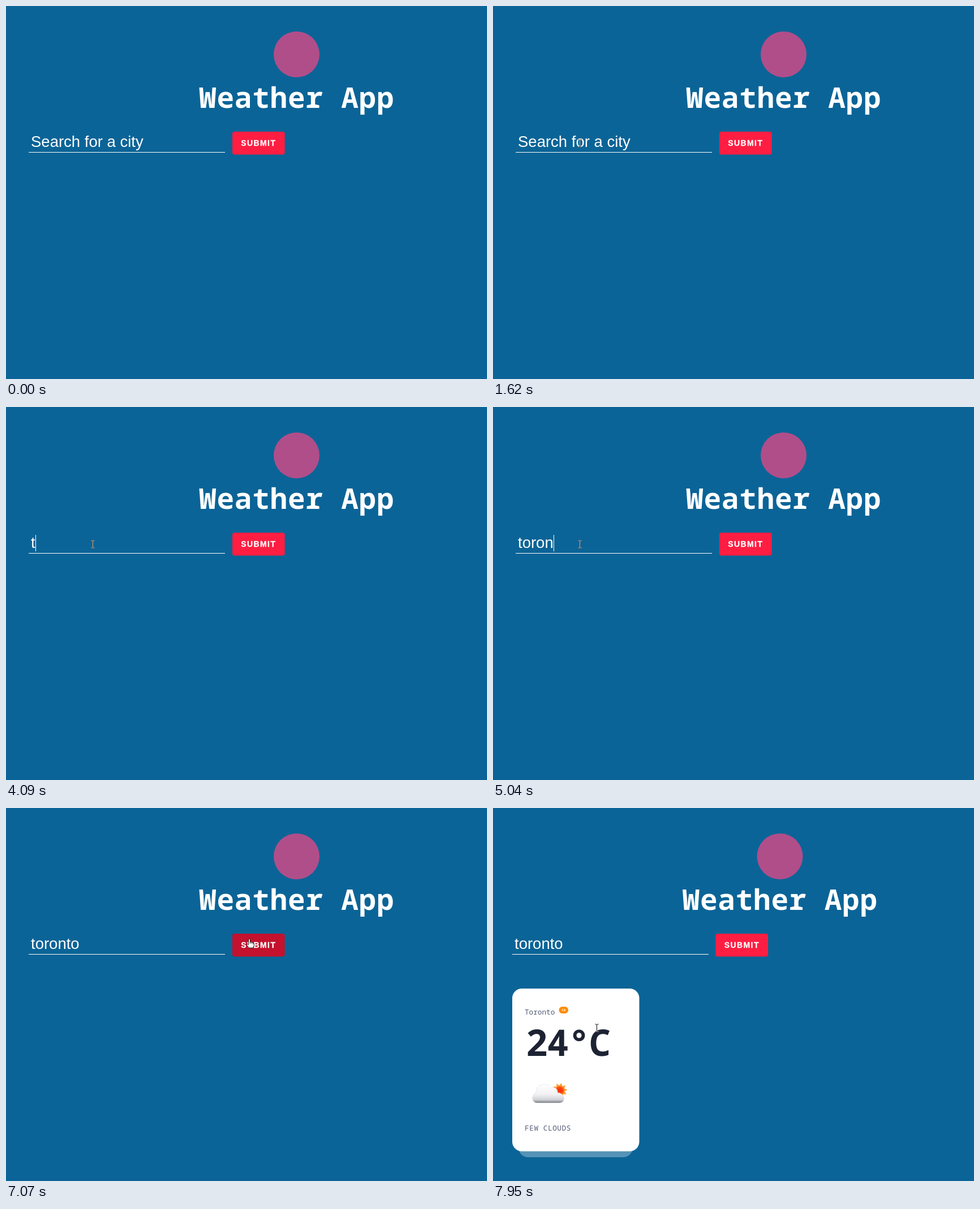
Animation, 850 px wide and 659 px high, one loop 8000 ms. Source, as an HTML page:

```html
<!DOCTYPE html>
<html lang="en">
<head>
<meta charset="utf-8">
<title>Weather App</title>
<style>
  html, body { margin: 0; width: 100%; height: 100%; overflow: hidden; background: #0b6497; }
  svg { display: block; width: 850px; height: 659px; }
  .mono { font-family: "Noto Sans Mono", "DejaVu Sans Mono", monospace; }
  .sans { font-family: "Liberation Sans", Arial, sans-serif; }
  #title { font-size: 51px; font-weight: 700; letter-spacing: .8px; fill: #fff; }
  #field { font-size: 27.5px; fill: #fff; }
  #label { font-size: 14px; font-weight: 700; letter-spacing: 1.4px; fill: #fff; stroke: #fff; stroke-width: .3px; }
  #temp { font-size: 65px; font-weight: 700; letter-spacing: -1.8px; fill: #1d2333; }
  .small { font-size: 12.7px; fill: #565c74; }
  #sky { letter-spacing: .58px; }
  #badge { font-size: 6px; font-weight: 700; fill: #fff; }
  #ibeam { mix-blend-mode: difference; }
</style>
</head>
<body>
<svg viewBox="0 0 850 659" xmlns="http://www.w3.org/2000/svg">
  <defs>
    <linearGradient id="cloudFill" x1="0" y1="0" x2="0" y2="1">
      <stop offset="0" stop-color="#fff"/>
      <stop offset=".55" stop-color="#f1f1f3"/>
      <stop offset=".84" stop-color="#cfd0d5"/>
      <stop offset="1" stop-color="#74767e"/>
    </linearGradient>
    <radialGradient id="sunFill">
      <stop offset="0" stop-color="#ff2a0a"/>
      <stop offset=".7" stop-color="#fb4712"/>
      <stop offset="1" stop-color="#ff8a1e"/>
    </radialGradient>
  </defs>
  <rect width="850" height="659" fill="#0b6497"/>

  <g id="head">
    <circle cx="513.5" cy="85.5" r="40.5" fill="#b04e8a"/>
    <text id="title" class="mono" x="341" y="180">Weather App</text>
    <rect id="button" x="400" y="222" width="92.6" height="40.5" rx="4"/>
    <text id="label" class="sans" x="415.3" y="247">SUBMIT</text>
  </g>
  <g id="search">
    <text id="field" class="sans" x="44" y="249"></text>
    <rect x="40" y="258" width="347" height="1" fill="#fff"/>
    <rect id="caret" y="226" width="1" height="29" fill="#fff"/>
  </g>

  <g id="card">
    <rect x="45" y="560" width="202" height="57" rx="17" fill="#fff" fill-opacity=".3"/>
    <rect x="34" y="319" width="224.5" height="287.5" rx="17" fill="#fff"/>
    <text class="mono small" x="56" y="365">Toronto</text>
    <rect x="116.5" y="351" width="16.5" height="12" rx="6" fill="#ff8c00"/>
    <text id="badge" class="mono" x="124.8" y="359.4" text-anchor="middle">CA</text>
    <text id="temp" class="mono" x="58" y="438">24°C</text>
    <g id="rays" fill="#ff9a2e"></g>
    <circle cx="118" cy="499" r="8" fill="url(#sunFill)"/>
    <path fill="url(#cloudFill)" stroke="#d5d6da" stroke-width=".5"
      d="M78 521C68 521 67 507 76 503C76 486 98 484 102 495C109 491 115 497 114 503C127 503 130 521 117 521Z"/>
    <text id="sky" class="mono small" x="56" y="570">FEW CLOUDS</text>
  </g>

  <path id="arrow" fill="#fff" stroke="#000" stroke-width="1" d="M0 0V16.5L3.8 12.9L6.2 18.6L8.8 17.5L6.4 11.9H11.8Z"/>
  <path id="ibeam" fill="none" stroke="#fff" stroke-width="1" d="M-3 -6.5H-1L0 -5.5L1 -6.5H3M0 -5.5V5.5M-3 6.5H-1L0 5.5L1 6.5H3"/>
  <g id="hand">
    <path fill="#fff" stroke="#000" stroke-width=".9" stroke-linejoin="round"
      d="M-1.4 1Q0 -1 1.4 1V6Q3 5 4 6.6Q5.6 5.8 6.5 7.4Q8.2 7 8.2 9.2V12.5L6.6 16.2H-.6L-4.4 11.2Q-4.6 8.9 -2.6 9.4L-1.4 10.6Z"/>
    <path fill="none" stroke="#000" stroke-width=".7" d="M1.4 6V9M4 6.8V9.2M6.4 7.6V9.6"/>
  </g>
</svg>
<script>
const LOOP = 8000;
const HINT = "Search for a city";
const RESULT_AT = 7140;
const $ = id => document.getElementById(id);

// time, text, caret shown
const typing = [
  [0, "", 0], [1090, "", 1], [1620, "", 0],
  [2090, "c", 1], [2220, "ca", 1], [2350, "can", 1], [2480, "cana", 1],
  [3010, "cana", 0], [3080, "can", 1], [3300, "ca", 0], [3430, "c", 1], [3560, "", 1],
  [4090, "t", 1], [4220, "to", 1], [4490, "tor", 1], [4620, "toro", 1],
  [5040, "toron", 1], [5310, "toront", 1], [5440, "toronto", 1],
  [5970, "toronto", 0], [6500, "toronto", 1], [7000, "toronto", 0]
];

// start, end, steps, easing, Bézier points
const easeOut = u => 1 - (1 - u) ** 2;
const easeBoth = u => u * u * (3 - 2 * u);
const linear = u => u;
const moves = [
  [320, 1090, 11, easeOut, [[529, 523], [330, 300], [147, 242]]],
  [1220, 1221, 1, linear, [[153, 242], [153, 242]]],
  [5970, 6730, 11, easeBoth, [[153, 242], [225, 330], [370, 325], [430, 231]]],
  [7140, 7740, 8, easeBoth, [[412, 231], [403, 236]]],
  [7740, 7950, 3, linear, [[403, 236], [252, 254], [183, 388]]]
];

const latest = (rows, t) => rows.filter(r => r[0] <= t).pop();
const ramp = (t, a, b) => Math.min(1, Math.max(0, (t - a) / (b - a)));
const mix = (a, b, u) => a + (b - a) * u;
const show = (el, on) => el.setAttribute("visibility", on ? "visible" : "hidden");
const shift = (el, x, y) => el.setAttribute("transform", `translate(${x} ${y})`);

function bezier(pts, u) {
  while (pts.length > 1)
    pts = pts.slice(1).map((p, i) => [mix(pts[i][0], p[0], u), mix(pts[i][1], p[1], u)]);
  return pts[0];
}

function pointer(t) {
  const move = latest(moves, t);
  if (!move) return null;
  const [from, to, steps, ease, pts] = move;
  const u = Math.floor(ramp(t, from, to) * steps + 1e-6) / steps;
  return bezier(pts, ease(u));
}

function pointerKind(x, y, t) {
  const within = (l, top, r, b) => x >= l && x <= r && y >= top && y <= b;
  if (within(36, 222, 387, 259)) return "ibeam";
  if (within(393, 222, 493, 262)) return "hand";
  if (t >= RESULT_AT && within(56, 380, 210, 450)) return "ibeam";
  return "arrow";
}

function draw(t) {
  const [, text, caret] = latest(typing, t);
  const done = t >= RESULT_AT;
  const field = $("field");
  const shown = text || HINT;
  if (field.textContent !== shown) field.textContent = shown;
  const end = text ? field.getComputedTextLength() : 0;
  $("caret").setAttribute("x", Math.round(44 + end));
  show($("caret"), caret);

  show($("card"), done);
  shift($("head"), done ? -6.5 : 0, 0);
  shift($("search"), done ? -6 : 0, 0);

  const hover = ramp(t, 6690, 6800) - ramp(t, 7770, 7940);
  const rgb = [[255, 196], [30, 17], [66, 45]].map(([a, b]) => Math.round(mix(a, b, hover)));
  $("button").setAttribute("fill", `rgb(${rgb})`);

  const pos = pointer(t);
  const kind = pos && pointerKind(...pos, t);
  for (const id of ["arrow", "ibeam", "hand"]) {
    show($(id), id === kind);
    if (id === kind) {
      const snap = id === "ibeam" ? 0.5 : 0;
      shift($(id), Math.round(pos[0]) + snap, Math.round(pos[1]) + snap);
    }
  }
}

for (let a = 0; a < 360; a += 36)
  $("rays").insertAdjacentHTML("beforeend",
    `<path d="M114.6 492L118 485.5L121.4 492Z" transform="rotate(${a + 12} 118 499)"/>`);

let start;
function tick(now) {
  start ??= now;
  draw((now - start) % LOOP);
  requestAnimationFrame(tick);
}
draw(0);
requestAnimationFrame(tick);
</script>
</body>
</html>
```
